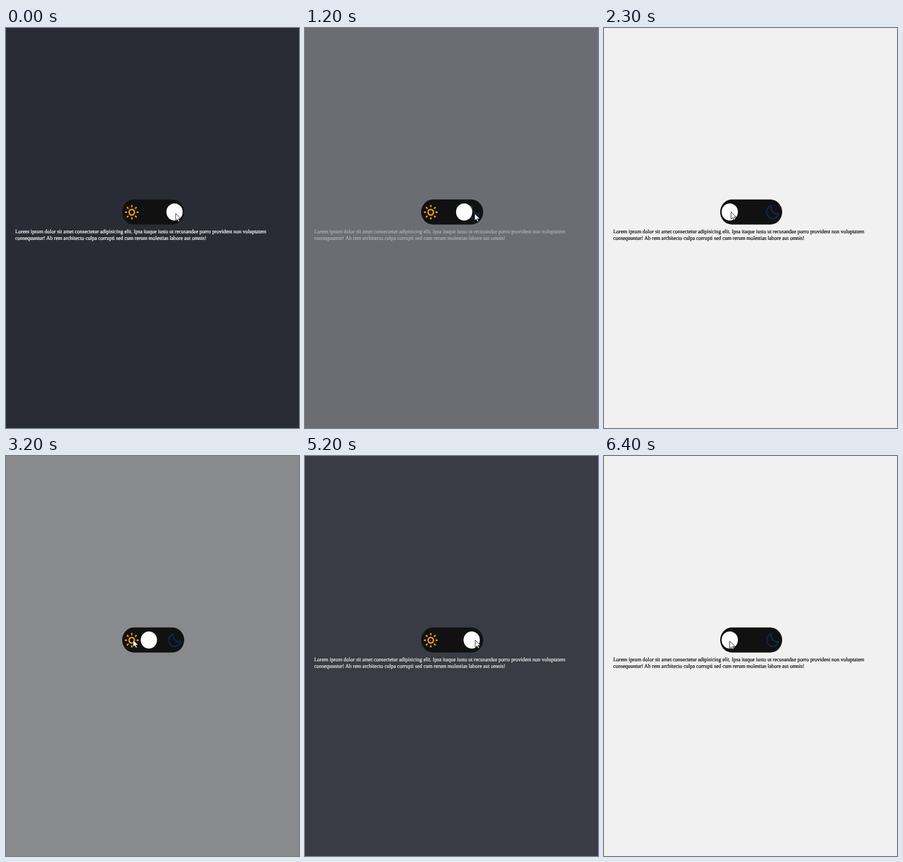
Recreate the animation shown at these times as an HTML page. Size 444x606 px, loop 6.8 s.

```html
<!DOCTYPE html>
<html lang="en">
<head>
<meta charset="utf-8">
<title>Theme toggle</title>
<style>
  html, body { margin: 0; width: 100%; height: 100%; overflow: hidden; }
  svg { display: block; width: 444px; height: 606px; }
  text {
    font: 7.96px "Liberation Serif", "Times New Roman", serif;
    text-rendering: geometricPrecision;
    fill: currentColor; stroke: currentColor; stroke-width: .2;
  }
</style>
</head>
<body>
<svg viewBox="0 0 444 606">
  <rect id="page" width="444" height="606"/>
  <g transform="translate(0 278.8) scale(1 1.06)">
    <g id="copy">
      <text x="14" y="30.4">Lorem ipsum dolor sit amet consectetur adipisicing elit. Ipsa itaque iusto ut recusandae porro provident non voluptatem</text>
      <text x="14" y="39.8">consequuntur! Ab rem architecto culpa corrupti sed cum rerum molestias labore aut omnis!</text>
    </g>
    <rect x="176" y="-17.9" width="94" height="35.8" rx="17.9" fill="#111"/>
    <g fill="none" stroke="#f3a01c" stroke-width="2.1" transform="translate(190.6 .3)">
      <circle r="4.1"/>
      <g id="rays"></g>
    </g>
    <path transform="translate(243.5 -11.7)" fill="none" stroke="#13284f" stroke-width="2" stroke-linejoin="round"
          d="M10 3A9.1 9.1 0 1 0 21 14A9.1 9.1 0 0 1 10 3Z"/>
    <circle id="thumb" r="12.3" fill="#fff"/>
  </g>
  <path id="cursor" d="M0 0V11L2.6 8.7L4.5 12.6L6.2 11.8L4.4 8H8Z" fill="#fff" stroke="#000" stroke-width=".7"/>
</svg>
<script>
const LOOP = 6800, STEP = 100, FADE = 200;
const CLICKS = [1134, 3095, 5184];
const DARK = { page: [41, 44, 53], text: [255, 255, 255] };
const LIGHT = { page: [241, 241, 241], text: [17, 17, 17] };

const REST = { x: 257, y: 281 };
const GLIDES = [
  { start: 1300, time: 600, x: 192.5, y: 278.5, swing: 0 },
  { start: 3450, time: 775, x: 258, y: 279, swing: 8 },
  { start: 5500, time: 900, x: 190.5, y: 280.5, swing: 0 }
];

const $ = id => document.getElementById(id);
const lerp = (a, b, k) => a + (b - a) * k;
const mix = (a, b, k) => `rgb(${a.map((v, i) => Math.round(lerp(v, b[i], k)))})`;
const progress = (t, start, time) => Math.min(1, Math.max(0, (t - start) / time));
const slide = u => u * (1 + u) / 2;

// 0 is dark, 1 is light; each click reverses the direction
const lightness = (t, ease = u => u) =>
  CLICKS.reduce((sum, start, i) => sum + (i % 2 ? -1 : 1) * ease(progress(t, start, FADE)), 0);

function pointerAt(t) {
  let { x, y } = REST;
  for (const glide of GLIDES) {
    const u = progress(t, glide.start, glide.time), k = u ** 1.5;
    x = lerp(x, glide.x, k);
    y = lerp(y, glide.y, k) + glide.swing * Math.sin(2 * Math.PI * u * u);
  }
  return [x, y];
}

function draw(now) {
  const t = Math.floor(now % LOOP / STEP) * STEP;
  const k = lightness(t);
  $("page").setAttribute("fill", mix(DARK.page, LIGHT.page, k));
  $("copy").setAttribute("color", mix(DARK.text, LIGHT.text, k));
  $("thumb").setAttribute("cx", lerp(255.4, 190.6, lightness(t, slide)));
  $("cursor").setAttribute("transform", `translate(${pointerAt(t)})`);
  requestAnimationFrame(draw);
}

for (let a = 0; a < 360; a += 45)
  $("rays").innerHTML += `<path d="M7.2 0H10.3" transform="rotate(${a})"/>`;
draw(performance.now());
</script>
</body>
</html>
```
